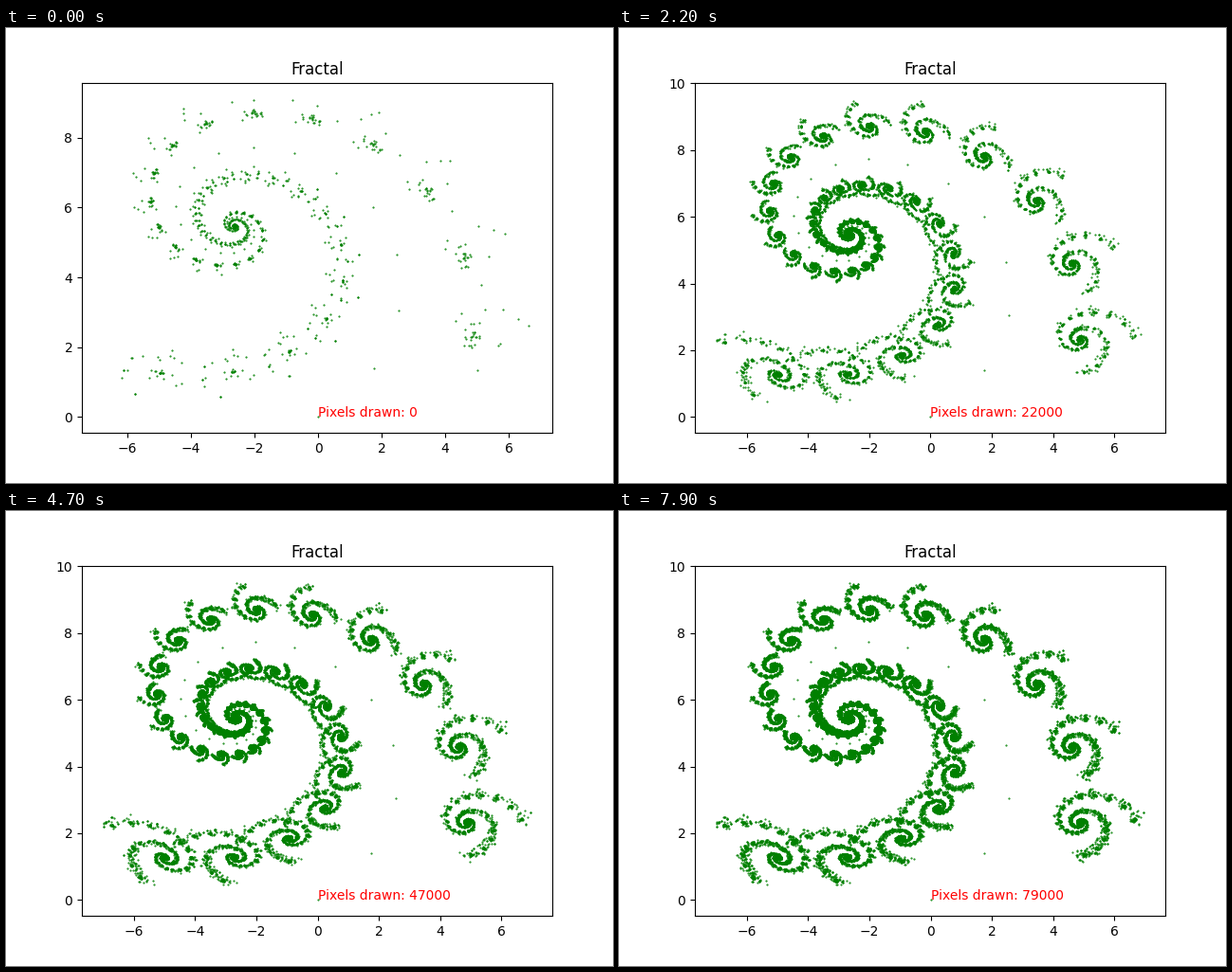
Write a matplotlib script that moves like this. It is 640 px wide and 480 px high and loops after 8 s.

```python
import random

import matplotlib.pyplot as plt
import numpy as np
from matplotlib.animation import FuncAnimation

FRAMES = 80
BATCH = 1000
OPENING = 24  # leading steps that all follow the main spiral
SIDE_SHARE = 0.03  # chance of each of the two small copies


def main_spiral(x, y):
    return (0.787879 * x - 0.424242 * y + 1.758647,
            0.242424 * x + 0.859848 * y + 1.408065)


def left_copy(x, y):
    return (-0.121212 * x + 0.257576 * y - 6.721654,
            0.151515 * x + 0.053030 * y + 1.377236)


def right_copy(x, y):
    return (0.181818 * x - 0.136364 * y + 6.086107,
            0.090909 * x + 0.181818 * y + 1.568035)


def chaos_game(count):
    rng = random.Random(7)
    points = [(0.0, 0.0)]
    while len(points) < count:
        draw = 1 if len(points) <= OPENING else rng.random()
        if draw < SIDE_SHARE:
            step = left_copy
        elif draw < 2 * SIDE_SHARE:
            step = right_copy
        else:
            step = main_spiral
        points.append(step(*points[-1]))
    return np.array(points)


def grow(full, gap, decay, frame):
    """Reach of the cloud, closing in on its full extent."""
    return full - gap * decay ** frame


points = chaos_game(FRAMES * BATCH)

fig, ax = plt.subplots(figsize=(6.4, 4.8), dpi=100)
ax.set_title("Fractal")
cloud, = ax.plot([], [], "g.", markersize=1)
label = ax.text(0, 0, "", color="red")


def update(frame):
    left = -grow(7.0, 0.24, 0.84, frame)
    right = grow(6.965, 0.265, 0.7, frame)
    top = grow(9.54, 0.42, 0.55, frame)
    x, y = points[:(frame + 1) * BATCH].T
    inside = (x >= left) & (x <= right) & (y <= top)
    cloud.set_data(x[inside], y[inside])
    pad = 0.05 * (right - left)
    ax.set_xlim(left - pad, right + pad)
    ax.set_ylim(-0.05 * top, 1.05 * top)
    label.set_text(f"Pixels drawn: {frame * BATCH}")
    return cloud, label


anim = FuncAnimation(fig, update, frames=FRAMES, interval=100, repeat=True,
                     repeat_delay=0, cache_frame_data=False)
plt.show()
```
